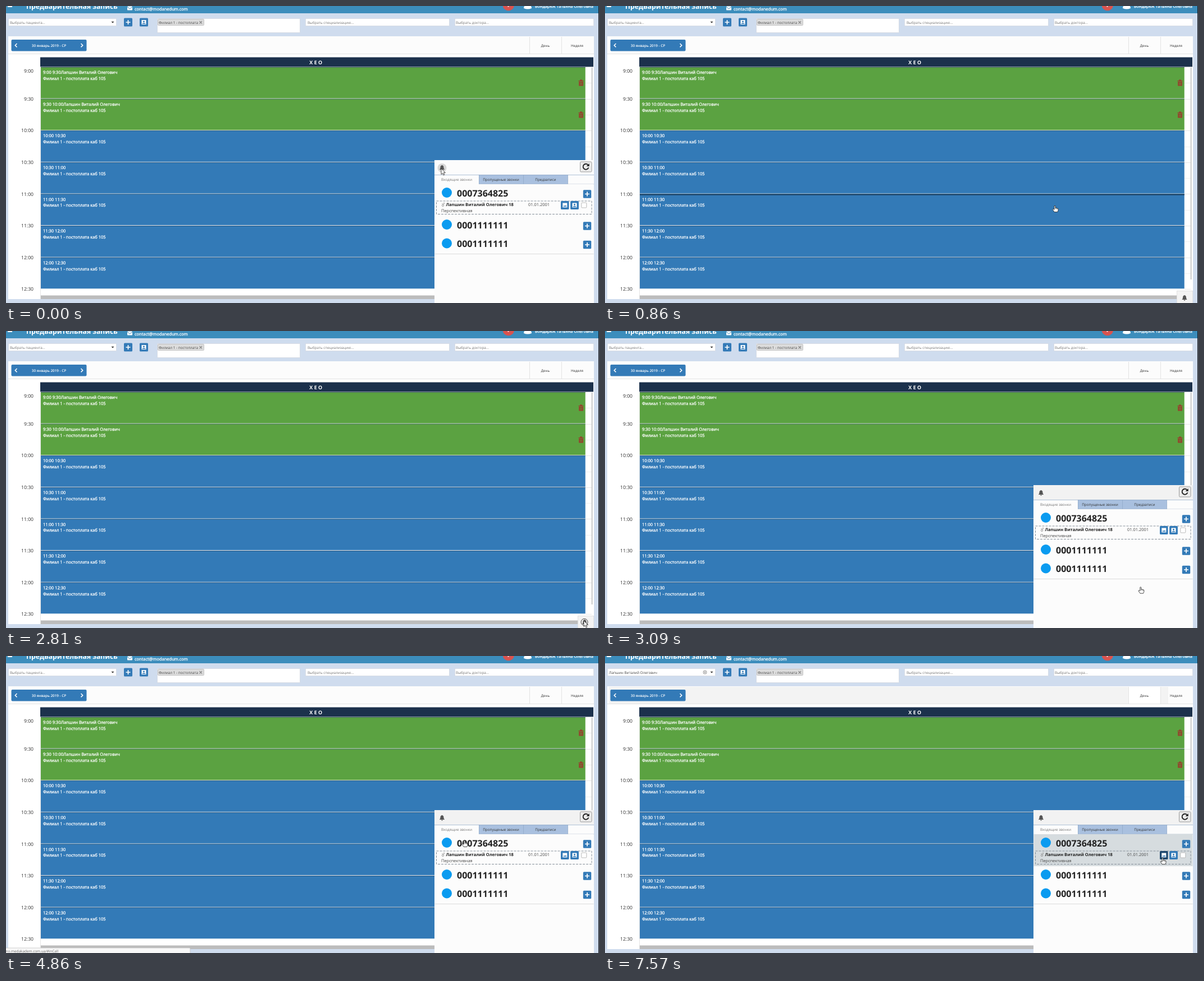
Write an HTML page that moves like this. It is 1056x530 px and loops after 8000 ms.

```html
<!DOCTYPE html>
<html lang="ru">
<head>
<meta charset="utf-8">
<title>Предварительная запись</title>
<style>
  html, body { margin: 0; width: 100%; height: 100%; overflow: hidden; background: #cfdcee; }
  svg { display: block; width: 1056px; height: 530px; }
  text { font-family: "Open Sans", "Noto Sans", sans-serif; text-rendering: geometricPrecision; white-space: pre; }
</style>
</head>
<body>
<svg id="stage" viewBox="0 0 1056 530"></svg>
<script>
const LOOP = 8000;
const BLUE = '#337ab7', GREEN = '#5ba241', INK = '#333', PALE = '#fcfcfc';
const PATIENT = 'Лапшин Виталий Олегович';
const PLACE = 'Филиал 1 - постоплата';
const ROW_H = 56.6, GRID_TOP = 109;

// Markup helpers
const rect = (x, y, w, h, fill, extra = '') =>
  `<rect x="${x}" y="${y}" width="${w}" height="${h}" fill="${fill}" ${extra}/>`;
const text = (x, y, size, str, fill = INK, extra = '') =>
  `<text x="${x}" y="${y}" font-size="${size}" fill="${fill}" ${extra}>${str}</text>`;
const path = (d, fill, extra = '') => `<path d="${d}" fill="${fill}" ${extra}/>`;
const stroke = (d, color, w, extra = '') =>
  path(d, 'none', `stroke="${color}" stroke-width="${w}" ${extra}`);
const dot = (x, y, r, fill, extra = '') =>
  `<circle cx="${x}" cy="${y}" r="${r}" fill="${fill}" ${extra}/>`;
const group = (inner, extra = '') => `<g ${extra}>${inner}</g>`;
const at = (x, y, inner) => group(inner, `transform="translate(${x} ${y})"`);
const hidden = (id, inner) => group(inner, `id="${id}" visibility="hidden"`);

const BOLD = 'font-weight="700"';
const FIRM = 'stroke="#fff" stroke-width=".28"';
const MID = 'text-anchor="middle"';
const END = 'text-anchor="end"';

// Icons, each around its own centre
const bell = (x, y, color = '#555') => at(x, y, path(
  'M0-5C-3.2-4.3-3-1-3.1.8L-4.6 3H4.6L3.1.8C3-1 3.2-4.3 0-5ZM-1.4 3.6A1.4 1.4 0 0 0 1.4 3.6Z', color));
const plusButton = (x, y, r = 7.5) => at(x, y,
  rect(-r, -r, 2 * r, 2 * r, BLUE, 'rx="1.5"') + stroke('M-4 0H4M0-4V4', '#fff', 1.7));
const cardButton = (x, y, r) => at(x, y,
  rect(-r, -r, 2 * r, 2 * r, BLUE, 'rx="1.5"') + rect(-4, -4, 8, 8, '#fff', 'rx=".6"') +
  dot(0, -1.3, 1.5, BLUE) + path('M-3 3C-3 .5 3 .5 3 3Z', BLUE));
const trash = y => at(1024, y,
  path('M-4.5-4H-2V-5.5H2V-4H4.5V-2.8H-4.5ZM-3.8-2H3.8V5.5H-3.8Z', '#9c3a2c') +
  stroke('M-1.6-.8V4.2M0-.8V4.2M1.6-.8V4.2', GREEN, .6));
const input = (x, w, h = 14) =>
  rect(x + .5, 22.5, w - 1, h - 1, '#fff', 'stroke="#d2d6de" stroke-width=".7"');

function header() {
  return rect(0, 0, 1056, 13, '#3c8dbc') +
    rect(3, 0, 8, 2, '#fff') +
    text(36, 5, 12.15, 'Предварительная запись', '#fff', BOLD) +
    rect(216, .5, 9, 7, '#fff', 'rx=".8"') +
    stroke('M216 1.5L220.5 5L225 1.5', '#3c8dbc', 1) +
    text(229, 7.5, 7.5, 'contact@modanedum.com', '#fff', FIRM) +
    dot(894.8, -2, 10.3, '#d9534f') + rect(893.5, 0, 2, 1.5, '#fff') +
    path('M922 4C922-1 926-2 929-2S936-1 936 4Q929 7 922 4Z', '#fff') +
    text(942, 2.5, 7.4, 'Бондарюк Татьяна Олеговна', '#fff', FIRM);
}

function filters() {
  return input(4, 193) + input(269, 255, 26) + input(533, 257) + input(799, 248) +
    group(text(7, 31.5, 6.3, 'Выбрать пациента...', '#777'), 'id="ask"') +
    hidden('chosen', text(7, 31.5, 6.4, PATIENT, '#444') +
      dot(178, 29, 3, 'none', 'stroke="#777" stroke-width=".8"') +
      stroke('M176.7 27.7L179.3 30.3M179.3 27.7L176.7 30.3', '#777', .8)) +
    path('M187.5 27.8H192.5L190 30.6Z', '#333') +
    plusButton(217.5, 29) + cardButton(245.5, 29, 7.5) +
    rect(270.5, 23.5, 82, 11, '#dcdcdc', 'rx="1" stroke="#c4c4c4"') +
    text(272, 31.5, 6.4, PLACE, '#444') +
    stroke('M344.5 27L349 31.5M349 27L344.5 31.5', '#888', 1.1) +
    text(537, 31.5, 6.3, 'Выбрать специализацию...', '#777') +
    text(801, 31.5, 6.4, 'Выбрать доктора...', '#777');
}

function toolbar() {
  return rect(4, 54, 1043, 469, '#fff') + rect(4, 54, 1043, 31, PALE) +
    hidden('dim', rect(7, 55, 996, 30, '#f3f3f3') + rect(933, 55, 56, 30, '#fff')) +
    stroke('M4 85.5H1047M932.5 55V85M989.5 55V85', '#e3e3e3', 1) +
    rect(9.5, 60, 134, 20.5, BLUE, 'rx="2"') +
    stroke('M19.5 67L16.3 70.2L19.5 73.4M133.5 67L136.7 70.2L133.5 73.4', '#fff', 1.5) +
    text(76.5, 72.7, 6.35, '30 январь 2019 - СР', '#fff', MID + ' font-weight="600"') +
    text(960.5, 72.7, 6.2, 'День', INK, MID) +
    text(1017, 72.7, 6.2, 'Неделя', INK, MID);
}

const clock = n => `${9 + (n >> 1)}:${n % 2 ? '30' : '00'}`;

function calendar() {
  let out = rect(61, 91.5, 985, 17, '#1c314c') +
    text(553, 103.5, 9, 'XEO', '#fff', `${MID} ${BOLD} letter-spacing="2.4"`) +
    stroke('M61.5 108.5V523', '#ddd', .8);
  for (let i = 0; i < 8; i++) {
    const y = GRID_TOP + i * ROW_H;
    out += text(49, i ? y + 3.2 : 119, 8.6, clock(i), INK, END);
    if (i > 6) break;
    const who = i < 2 ? PATIENT : '';
    out += rect(62, y, 969.7, ROW_H - .9, i < 2 ? GREEN : BLUE) +
      rect(62, y, 969.7, .8, '#1f3d58', 'opacity=".75"') +
      rect(1032, Math.round(y + ROW_H / 2), 11, 1, '#f0f0f0') +
      rect(1032, Math.round(y + ROW_H), 11, 1, '#e8e8e8') +
      text(66, y + 12.1, 7.5, `${clock(i)} ${clock(i + 1)}${who}`, '#fff', FIRM) +
      text(66, y + 22.9, 7.5, PLACE + ' каб 105', '#fff', FIRM);
  }
  return out + `<rect id="edge" x="62" width="969.7" height="2.3" fill="#1c4468" visibility="hidden"/>` +
    trash(137) + trash(194) +
    rect(1042.6, 110, 2, 378, '#c8c8c8') +
    rect(62, 516.5, 984, 6.5, '#bcbcbc') +
    rect(1055, 0, 1, 530, '#10151c');
}

function corner() {
  return group(rect(1018.5, 508.5, 28, 22, '#f3f3f3', 'stroke="#e2e2e2"') +
    hidden('glow', dot(1030, 520, 7, '#d8d8d8')) +
    bell(1032, 521) +
    hidden('ring', dot(1030, 519.5, 6, '#eee', 'stroke="#444" stroke-width="1"') + bell(1030.5, 520)),
    'id="corner"');
}

// Call list rows: [top, height, number, centre of the number]
const CALLS = [
  [318, 57, '0007364825', 334],
  [375, 33, '0001111111', 391],
  [408, 34, '0001111111', 424.5]
];

function call([y, h, number, mid], i) {
  return rect(763.5, y, 283, h, PALE, `id="call${i}"`) +
    rect(763.5, y + h, 283, 1, '#dcdcdc') +
    dot(785, mid - 1, 9, '#0a9bf0') +
    text(803, mid + 5.8, 16, number, '#222', BOLD) +
    plusButton(1035, mid + 1.5, 7.2);
}

function panel() {
  const tabs = ['Входящие звонки', 'Пропущеные звонки', 'Предзаписи'];
  return group(
    rect(763, 275, 284, 255, PALE) +
    rect(763, 275, 284, 26, PALE, 'id="bar"') +
    hidden('halo', dot(776.5, 289, 8, '#d8d8d8')) +
    bell(776.5, 289) +
    rect(1022.5, 278, 20.5, 18, '#ececec', 'rx="1.5" stroke="#9a9a9a"') +
    at(1032.7, 286.7, stroke('M3.7-3.3A5 5 0 1 0 4.7 1.6', '#222', 1.9) +
      path('M6-5.8V-.6H.8Z', '#222')) +
    rect(842, 301, 158.5, 17, '#a9c0df') +
    stroke('M763 301.5H1047M842.5 301V318M921.5 301V318M1000.5 301V318', '#8ea8c8', .7) +
    stroke('M842 318H1047', '#a9b8ca', .7) +
    tabs.map((s, i) => text([802.5, 881.5, 961][i], 312, 6.35, s, i ? INK : '#777', MID)).join('') +
    CALLS.map(call).join('') +
    stroke('M766.5 348H1043V371.5H766.5Z', '#87919b', 1, 'stroke-dasharray="4 2"') +
    dot(778, 356, 1.6, 'none', 'stroke="#888" stroke-width=".8"') +
    stroke('M779 354.8L781 351.5H778.8M776 353H779', '#888', .7) +
    text(783.5, 356.8, 7.5, PATIENT + ' 18', '#222', BOLD) +
    text(930, 356.8, 7.45, '01.01.2001', '#444') +
    text(775, 368, 7.45, 'Перспективная', '#444') +
    rect(988, 348, 14.5, 15, BLUE, 'id="save" rx="1.5"') +
    path('M991.3 351.5H999.3V359.3H991.3Z', '#fff') +
    path('M992.3 358L994.2 355.7L995.4 357L996.7 355.2L998.4 358Z', BLUE) +
    cardButton(1012.5, 355.5, 7.4) +
    rect(1024.8, 351, 9, 9, '#fff', 'rx="1" stroke="#aaa" stroke-width=".8"'),
    'id="panel"');
}

function overlay() {
  return hidden('status', rect(-2, 521, 330, 11, '#f8f8f8', 'rx="1.5" stroke="#c5c5c5" stroke-width=".8"') +
      text(93, 529, 6.4, 'demo.medakadem.com.ua/#inCall', '#666', END)) +
    group(
      group(path('M0 0V10.5L2.4 8.3L4 12L5.8 11.2L4.2 7.6H7.4Z', '#fff',
        'stroke="#222" stroke-width=".8"'), 'id="arrow"') +
      group(path('M-1 .8Q0-.4 1 .8V4.4Q2.6 3.8 3 4.8Q4.2 4.2 4.6 5.2Q6 4.9 6 6.2V8.6L4.8 11.6H-.8L-3.8 7.4Q-3.9 5.8-2.2 6.4L-1 7.4Z', '#fff',
        'stroke="#222" stroke-width=".8" stroke-linejoin="round"') +
        stroke('M1 4.4V6.4M3 4.8V6.6M4.6 5.2V6.8', '#222', .6), 'id="hand"'),
      'id="pointer"');
}

const stage = document.getElementById('stage');
stage.innerHTML = header() + filters() + toolbar() + calendar() + corner() + panel() + overlay();
const $ = id => document.getElementById(id);
const show = (id, on) => $(id).setAttribute('visibility', on ? 'visible' : 'hidden');
const toggle = (id, on) => $(id).setAttribute('display', on ? 'inline' : 'none');

// Screen updates come in bursts: [start, end, steps]
const BURSTS = [
  [150, 590, 4], [860, 1830, 8], [1950, 2530, 5], [2810, 3790, 8],
  [3940, 4860, 7], [5000, 5970, 8], [7280, 7570, 3]
];

// Pointer tip: [time, x, y]
const TRAIL = [
  [0, 775, 290], [150, 775, 290], [590, 795, 350], [860, 801, 356],
  [1553, 921, 462], [1830, 930, 470], [1950, 940, 478], [2530, 1029, 517],
  [2810, 1029, 517], [3510, 841, 366], [3790, 836, 362], [3940, 832, 352],
  [4400, 816, 313], [4707, 812, 314], [4860, 816, 329], [5000, 830, 336],
  [5970, 993, 360], [LOOP, 993, 360]
];

function snap(t) {
  let q = 0;
  for (const [a, b, n] of BURSTS) {
    if (t < a) break;
    const step = (b - a) / (n - 1);
    q = a + step * Math.min(n - 1, Math.floor((t - a + 1) / step));
  }
  return q;
}

function tip(t) {
  const i = Math.max(1, TRAIL.findIndex(p => p[0] >= t));
  const [a, ax, ay] = TRAIL[i - 1], [b, bx, by] = TRAIL[i];
  const k = (t - a) / (b - a);
  return [ax + (bx - ax) * k, ay + (by - ay) * k];
}

function draw(time) {
  const q = snap(time % LOOP);
  const [x, y] = tip(q);
  const open = q < 150 || q >= 2949;
  const onBell = q < 150 || (q >= 2529 && q < 2949);
  const linked = q >= 4399 && q < 5000;
  const picked = q >= 7424;

  toggle('panel', open);
  toggle('corner', !open);
  show('halo', q < 150);
  show('glow', onBell && q < 2810);
  show('ring', q >= 2810);
  $('bar').setAttribute('fill', q < 150 ? PALE : '#f2f2f2');
  CALLS.forEach(([top, h], i) => {
    const over = open && !linked && y >= top && y < top + h;
    $('call' + i).setAttribute('fill', over ? '#d6dcdf' : PALE);
  });
  const onSave = q >= 5000 && x > 988 && y < 363;
  $('save').setAttribute('fill', q >= 7280 ? '#1d476d' : onSave ? '#286090' : BLUE);

  const row = Math.floor((y - GRID_TOP) / ROW_H);
  show('edge', !open && q > 150 && row < 7);
  $('edge').setAttribute('y', GRID_TOP + row * ROW_H);

  show('status', linked);
  show('ask', !picked);
  show('chosen', picked);
  show('dim', picked);
  show('arrow', onBell);
  show('hand', !onBell);
  $('pointer').setAttribute('transform', `translate(${x} ${y})`);
}

const start = performance.now();
function tick() {
  draw(performance.now() - start);
  requestAnimationFrame(tick);
}
tick();
</script>
</body>
</html>
```
